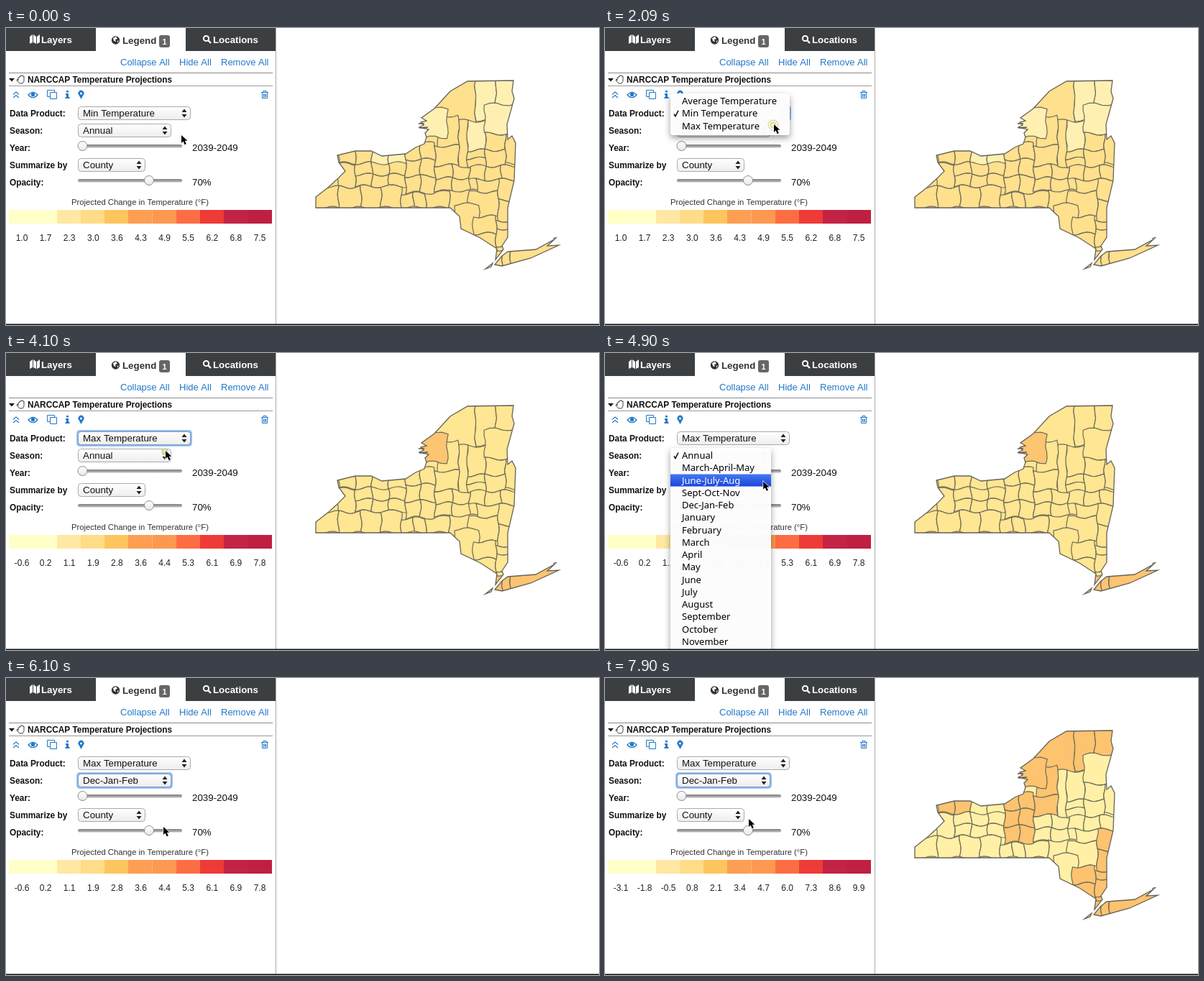
Animation of 825 by 413 pixels, one loop 8 s. Source, as an HTML page with a canvas:

```html
<!DOCTYPE html>
<html lang="en">
<head>
<meta charset="utf-8">
<title>Temperature projections</title>
<style>
html, body { margin: 0; width: 100%; height: 100%; overflow: hidden; background: #fff; }
canvas { display: block; }
</style>
</head>
<body>
<canvas id="stage" width="825" height="413"></canvas>
<script>
const ctx = document.getElementById('stage').getContext('2d');
const LOOP = 8000;
const TICK = 200;
const ROW = 17.25;
const SANS = '"Liberation Sans", Arial, sans-serif';
const BLUE = '#2278c8';
const DARK = '#3c3f41';

// cursor key points: time, x, y
const CURSOR = [
  [100, 244, 149], [700, 235, 112], [1300, 235, 112], [1900, 235, 134], [2500, 235, 134],
  [2900, 222, 136], [4300, 222, 136], [5300, 219, 207], [7700, 219, 207], [7900, 200, 196]
];
const CLICKS = [700, 1900, 4100, 5300];

const MENUS = [
  { open: 900, pick: 2090, close: 2290, x: 91, y: 91, w: 166, h: 58, checked: 1,
    items: ['Average Temperature', 'Min Temperature', 'Max Temperature'] },
  { open: 4300, pick: 5490, close: 5900, x: 91, y: 132, w: 140, h: 300, checked: 0,
    items: ['Annual', 'March-April-May', 'June-July-Aug', 'Sept-Oct-Nov', 'Dec-Jan-Feb',
      'January', 'February', 'March', 'April', 'May', 'June', 'July', 'August',
      'September', 'October', 'November', 'December'] }
];

const RAMP = ['#ffffc8', '#ffffc8', '#ffe8a3', '#fedc88', '#fec55f', '#fd9e52',
  '#fd9850', '#fd6d43', '#ee3b38', '#c32344', '#bf2041'];

const VIEWS = [
  { from: 0, hideAt: 2500, base: '#fee08d', tint: '#fff0b2', low: 1.04, step: .643,
    tinted: ['jefferson', 'northeast', 'essex', 'hamilton', 'monroe'] },
  { from: 2700, hideAt: 6100, base: '#ffe692', tint: '#fdc471', low: -.6, step: .838,
    tinted: ['jefferson', 'island'] },
  { from: 6300, hideAt: LOOP, base: '#fff0a5', tint: '#fdc36f', low: -3.1, step: 1.3,
    tinted: ['jefferson', 'stLawrence', 'northeast', 'lewis', 'oneida', 'niagara', 'centre',
      'hudson', 'orange', 'island'] }
];

const land = new Path2D(
  'M431 250V235L449 221 461 210 472 199 463 187 461 177 486 171H508L523 178 556 175 570 166 582 161 ' +
  '585 152 583 146 588 141 575 138 581 135 577 131 585 129 578 125 596 112 618 88 642 74 706 73 ' +
  '704 88 707 98 697 134 698 155 704 150 709 160 707 212 698 250V291L690 303 692 308 681 322 ' +
  '683 307 660 292 633 279 631 262 618 250Z' +
  'M690 317L698 311 737 308 763 294 753 303 769 302 730 320 690 331 680 329Z M667 335L677 327 675 332Z');

// county groups made of even grids: left, top, right, bottom, columns, rows
const COUNTIES = {
  southernTier: [[431, 221, 494, 250, 2, 1], [494, 220, 550, 250, 2, 1], [550, 230, 584, 250, 2, 1], [584, 228, 617, 250, 1, 1]],
  erie: [[461, 189, 486, 221, 1, 1]],
  niagara: [[463, 165, 509, 188, 2, 1]],
  monroe: [[509, 165, 556, 190, 2, 1]],
  fingerLakes: [[486, 188, 556, 220, 3, 2]],
  centre: [[556, 160, 597, 229, 2, 3]],
  stLawrence: [[590, 70, 653, 130, 1, 1]],
  lewis: [[601, 122, 630, 164, 1, 1]],
  jefferson: [[570, 112, 614, 152, 1, 1]],
  oneida: [[597, 164, 630, 191, 1, 1]],
  mohawk: [[597, 191, 645, 227, 2, 2], [630, 129, 642, 192, 1, 1], [642, 170, 667, 193, 1, 2]],
  northeast: [[653, 70, 710, 128, 2, 1]],
  hamilton: [[642, 129, 667, 170, 1, 1]],
  essex: [[666, 106, 710, 147, 1, 1]],
  saratoga: [[667, 147, 695, 192, 1, 2], [695, 147, 712, 189, 1, 1]],
  catskills: [[617, 226, 656, 262, 1, 1], [645, 192, 711, 211, 3, 1], [655, 211, 686, 228, 1, 1],
    [643, 228, 685, 262, 1, 1], [625, 245, 658, 290, 1, 1]],
  orange: [[650, 262, 682, 310, 1, 2]],
  hudson: [[685, 211, 712, 268, 1, 2], [682, 268, 702, 279, 1, 1], [682, 279, 705, 326, 1, 2]],
  island: [[660, 322, 680, 340, 1, 1], [680, 308, 702, 336, 2, 1], [702, 288, 775, 332, 1, 1]]
};

// Shared smooth warp, so neighbouring borders stay joined.
const warp = (x, y) => [
  x + 1.3 * Math.sin(y / 5 + x / 17),
  y + 2.2 * Math.sin(x / 6 + y / 23)
];

function cellPath(left, top, right, bottom) {
  const corners = [[left, top], [right, top], [right, bottom], [left, bottom]];
  const path = new Path2D();
  corners.forEach(([x, y], i) => {
    const [nx, ny] = corners[(i + 1) % 4];
    for (let k = 0; k < 5; k++) path.lineTo(...warp(x + (nx - x) * k / 5, y + (ny - y) * k / 5));
  });
  path.closePath();
  return path;
}

const cells = Object.entries(COUNTIES).flatMap(([group, grids]) =>
  grids.flatMap(([left, top, right, bottom, cols, rows]) =>
    Array.from({ length: cols * rows }, (_, i) => {
      const w = (right - left) / cols, h = (bottom - top) / rows;
      const x = left + (i % cols) * w, y = top + Math.floor(i / cols) * h;
      return { group, path: cellPath(x, y, x + w, y + h) };
    })));

function text(str, x, y, size, color = '#111', weight = '', align = 'left') {
  ctx.font = `${weight} ${size}px ${SANS}`;
  ctx.fillStyle = color;
  ctx.textAlign = align;
  ctx.fillText(str, x, y);
}

function rect(x, y, w, h, color) {
  ctx.fillStyle = color;
  ctx.fillRect(x, y, w, h);
}

function round(x, y, w, h, r) {
  ctx.beginPath();
  ctx.roundRect(x, y, w, h, r);
}

function fillPath(d, color) {
  ctx.fillStyle = color;
  ctx.fill(new Path2D(d), 'evenodd');
}

function strokePath(d, color, width = 1) {
  ctx.strokeStyle = color;
  ctx.lineWidth = width;
  ctx.stroke(new Path2D(d));
}

function circle(x, y, r, fill, stroke, width = 1) {
  ctx.beginPath();
  ctx.arc(x, y, r, 0, Math.PI * 2);
  if (fill) { ctx.fillStyle = fill; ctx.fill(); }
  if (stroke) { ctx.strokeStyle = stroke; ctx.lineWidth = width; ctx.stroke(); }
}

function verticalGradient(y, h, top, bottom) {
  const g = ctx.createLinearGradient(0, y, 0, y + h);
  g.addColorStop(0, top);
  g.addColorStop(1, bottom);
  return g;
}

function drawTabs() {
  rect(0, 0, 125, 32, DARK);
  rect(250, 0, 125, 32, DARK);
  text('Layers', 49, 20.5, 13.3, '#fff', 'bold');
  text('Legend', 162, 21.5, 13.3, '#333', 'bold');
  text('Locations', 288, 20.5, 13.3, '#fff', 'bold');
  fillPath('M33 12L37 9V20L33 22Z M38 9L42 12V22L38 20Z M43 12L47 9V20L43 22Z', '#fff');
  circle(152.5, 17, 5.7, '#333');
  fillPath('M149 14L153 12 155 15 152 16 153 19 150 18Z M155 18L157 17 155 21Z', '#fff');
  circle(278.5, 14.5, 3.6, null, '#fff', 2);
  strokePath('M281 17L285 21', '#fff', 2.4);
  round(213, 10, 15, 17, 3);
  ctx.fillStyle = '#666';
  ctx.fill();
  text('1', 220.5, 22.5, 11, '#fff', 'bold', 'center');
}

function drawToolbar() {
  text('Collapse All', 159, 52, 13, BLUE);
  text('Hide All', 241, 52, 13, BLUE);
  text('Remove All', 299, 52, 13, BLUE);
  rect(4, 62, 367, 1, '#888');
  rect(4, 80, 367, 1, '#999');
  fillPath('M4 70H12L8 74.5Z', '#111');
  strokePath('M17 73V69H19V67H21V66H23V67H25V74L23 77H19L15 73 16 71Z', '#444');
  text('NARCCAP Temperature Projections', 30, 76, 11.85, '#111', 'bold');
  strokePath('M10 92.5L14 89 18 92.5 M10 97L14 93.5 18 97', BLUE, 1.1);
  strokePath('M31 93Q37.5 85.5 44 93Q37.5 100.5 31 93Z', BLUE, 1.2);
  circle(37.5, 92.5, 2.7, BLUE);
  strokePath('M61 95.5H57.5V86.5H67.5V89 M61.5 89.5H70.5V98.5H61.5Z', BLUE);
  fillPath('M84 87H87V89.5H84Z M83 91H87V96H88.5V98H82.5V96H84V93H83Z', BLUE);
  fillPath('M104.5 99L101.6 93.5A4 4 0 1 1 107.4 93.5Z M106 91A1.5 1.5 0 1 0 103 91A1.5 1.5 0 1 0 106 91Z', BLUE);
  strokePath('M355 89.5H365 M358 89V87.5H362V89 M356.5 90V97.5H363.5V90 M358.5 91.5V96 M360 91.5V96 M361.5 91.5V96', BLUE);
}

function drawSelect(label, y, w, focused) {
  const x = 100, mid = y + 9.5, arrowX = x + w - 12.5;
  if (focused) {
    round(x - .5, y - .5, w + 1, 20, 3);
    ctx.strokeStyle = '#86b5e8';
    ctx.lineWidth = 2.5;
    ctx.stroke();
  }
  round(x + .5, y + .5, w - 1, 18, 4);
  ctx.fillStyle = verticalGradient(y, 19, '#fff', '#ededed');
  ctx.fill();
  ctx.strokeStyle = focused ? '#7b9fd0' : '#aaa';
  ctx.lineWidth = 1;
  ctx.stroke();
  text(label, 107, y + 14, 13.33);
  fillPath(`M${arrowX} ${mid - 1.5}h7l-3.5 -4.5Z M${arrowX} ${mid + 1.5}h7l-3.5 4.5Z`, '#222');
}

function drawSlider(y, x) {
  round(100, y - 2, 145, 4.5, 2);
  ctx.fillStyle = verticalGradient(y - 2, 4.5, '#808080', '#bdbdbd');
  ctx.fill();
  circle(x, y, 6.5, verticalGradient(y - 6, 13, '#fff', '#e6e6e6'), '#8c8c8c');
}

function drawForm(t) {
  const [product, season] = MENUS;
  ['Data Product:', 'Season:', 'Year:', 'Summarize by', 'Opacity:'].forEach((label, i) =>
    text(label, 5, 123 + 24 * i, 11.85, '#111', 'bold'));
  drawSelect(t < product.close ? 'Min Temperature' : 'Max Temperature', 109, 157,
    t >= product.pick && t < season.open);
  drawSelect(t < season.close ? 'Annual' : 'Dec-Jan-Feb', 133, 130, t >= season.close);
  drawSelect('County', 181, 94, false);
  drawSlider(164, 106.5);
  drawSlider(212, 199);
  text('2039-2049', 259, 171, 13.33);
  text('70%', 259, 219, 13.33);
}

function drawLegend({ low, step }) {
  text('Projected Change in Temperature (°F)', 91, 246, 11.3, '#333');
  const edge = i => Math.round(4 + i * 33.25);
  RAMP.forEach((color, i) => {
    rect(edge(i), 253, edge(i + 1) - edge(i), 19, color);
    text((low + i * step).toFixed(1), 22 + i * 33.1, 295.5, 12, '#222', '', 'center');
  });
  rect(203, 253, 1, 19, '#fdb47c');
}

function drawMap({ base, tint, tinted }) {
  ctx.save();
  ctx.clip(land);
  rect(430, 70, 345, 270, base);
  ctx.strokeStyle = '#6f6a59';
  ctx.lineWidth = 1.2;
  for (const { group, path } of cells) {
    ctx.fillStyle = tinted.includes(group) ? tint : base;
    ctx.fill(path);
    ctx.stroke(path);
  }
  ctx.restore();
  ctx.strokeStyle = '#66635a';
  ctx.lineWidth = 1.3;
  ctx.stroke(land);
  strokePath('M574 133L582 133 M575 139L587 138 M761 293L766 291', '#555', 1.3);
}

function drawMenu({ x, y, w, h, items, checked, pick }, t, cursorY) {
  const hot = t < pick ? Math.floor((cursorY - y - 2) / ROW) : -1;
  ctx.save();
  ctx.shadowColor = 'rgba(0,0,0,.4)';
  ctx.shadowBlur = 9;
  ctx.shadowOffsetY = 4;
  ctx.fillStyle = 'rgba(255,255,255,.97)';
  round(x, y, w, h, 4);
  ctx.fill();
  ctx.restore();
  items.forEach((item, i) => {
    const mid = y + 10.5 + i * ROW;
    const color = i === hot ? '#fff' : '#000';
    if (i === hot) rect(x, mid - 8.5, w, 17, verticalGradient(mid - 8.5, 17, '#4678f0', '#1746dc'));
    ctx.font = '13px "Noto Sans", sans-serif';
    ctx.textAlign = 'left';
    ctx.fillStyle = color;
    ctx.fillText(item, 107, mid + 4.5);
    if (i === checked) strokePath(`M96 ${mid + 1}l2 3l4 -8`, color, 1.5);
  });
}

function cursorAt(time) {
  const next = CURSOR.findIndex(key => key[0] > time);
  if (next === 0) return CURSOR[0].slice(1);
  if (next < 0) return CURSOR.at(-1).slice(1);
  const [t0, x0, y0] = CURSOR[next - 1], [t1, x1, y1] = CURSOR[next];
  const k = (time - t0) / (t1 - t0);
  return [x0 + (x1 - x0) * k, y0 + (y1 - y0) * k];
}

function drawClick(x, y, age) {
  const radius = 4 + 3 * age / TICK;
  const alpha = 1 - age / 600;
  circle(x, y, radius, `rgba(250,250,215,${alpha})`, `rgba(185,185,130,${alpha})`);
  if (age < 2 * TICK) circle(x, y, radius / 2, null, '#d8d56a', 1.5);
}

function drawCursor(x, y) {
  const arrow = `M${x} ${y}v11l2.6 -2.4l2 4.6l2.2 -1l-2 -4.4h3.6Z`;
  strokePath(arrow, '#fff', 1.5);
  fillPath(arrow, '#000');
}

function draw(t) {
  // The pointer moves in steps, on odd multiples of 100 ms.
  const tick = Math.floor((t + 110) / TICK) * TICK - 100;
  const [x, y] = cursorAt(tick);
  const view = VIEWS.findLast(v => v.from <= t);
  const menu = MENUS.find(m => t >= m.open && t < m.close);
  const click = CLICKS.find(c => tick >= c && tick <= c + 2 * TICK);
  rect(0, 0, 825, 413, '#fff');
  drawTabs();
  drawToolbar();
  drawForm(t);
  drawLegend(view);
  rect(375, 0, 1, 412, '#aaa');
  if (t < view.hideAt) drawMap(view);
  if (menu) drawMenu(menu, t, y);
  if (click) drawClick(x - 1, y + 1, tick - click);
  drawCursor(x, y);
  rect(0, 411.5, 825, 1.5, '#111');
}

const start = performance.now();
function frame() {
  draw((performance.now() - start) % LOOP);
  requestAnimationFrame(frame);
}
frame();
</script>
</body>
</html>
```
